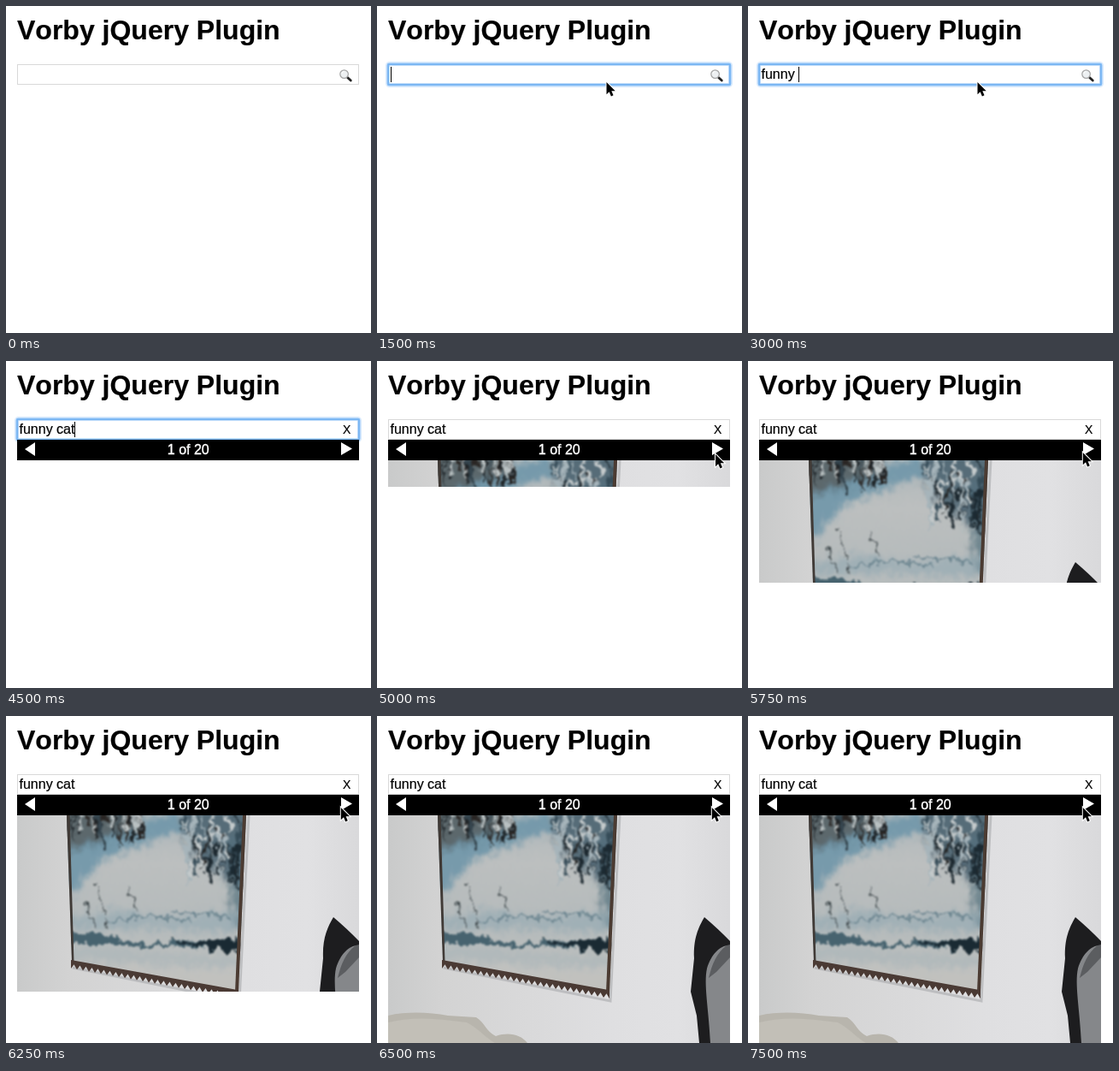
An HTML page that plays this animation: 427x382 px, repeating every 8 s.

```html
<!DOCTYPE html>
<html lang="en">
<head>
<meta charset="utf-8">
<title>Image search plugin</title>
<style>
html, body { margin: 0; width: 100%; height: 100%; overflow: hidden; background: #fff; }
svg { display: block; width: 427px; height: 382px; }
text { font: 16px "Liberation Sans", Arial, sans-serif; font-kerning: none; white-space: pre; stroke: #000; stroke-width: .2px; }
.title { font-size: 32px; font-weight: bold; }
.clear { font-size: 14px; }
.count { fill: #fff; stroke: #fff; stroke-width: .4px; }
</style>
</head>
<body>
<svg viewBox="0 0 427 382" xmlns="http://www.w3.org/2000/svg">
  <defs>
    <linearGradient id="wall">
      <stop offset="0" stop-color="#c9caca"/>
      <stop offset=".16" stop-color="#d3d3d3"/>
      <stop offset=".66" stop-color="#dfdfe1"/>
      <stop offset=".85" stop-color="#e1e1e3"/>
      <stop offset="1" stop-color="#d9d9db"/>
    </linearGradient>
    <linearGradient id="snow" x2="0" y2="1">
      <stop offset="0" stop-color="#a9b4b8"/>
      <stop offset=".3" stop-color="#bcbfbf"/>
      <stop offset=".6" stop-color="#b4babb"/>
      <stop offset=".8" stop-color="#c0c1bf"/>
      <stop offset="1" stop-color="#c4c1bb"/>
    </linearGradient>
    <clipPath id="loaded"><rect id="reveal" x="13" y="116" width="400" height="0"/></clipPath>
    <clipPath id="cloth"><path d="M71 116H281L272 322 77 288Z"/></clipPath>
    <filter id="soft" x="-20%" y="-20%" width="140%" height="140%"><feGaussianBlur stdDeviation="4"/></filter>
    <filter id="fine" x="-10%" y="-10%" width="120%" height="120%"><feGaussianBlur stdDeviation=".7"/></filter>
    <filter id="paint" color-interpolation-filters="sRGB" x="0" y="0" width="100%" height="100%">
      <feTurbulence type="fractalNoise" baseFrequency=".11 .08" numOctaves="3" seed="4" result="noise"/>
      <feDisplacementMap in="SourceGraphic" in2="noise" scale="17" xChannelSelector="R" yChannelSelector="G"/>
      <feGaussianBlur stdDeviation=".9"/>
    </filter>
  </defs>

  <text class="title" x="13" y="39">Vorby jQuery Plugin</text>

  <rect id="border" x="13.5" y="68.5" width="399" height="23" fill="#fff" stroke="#d9d9d9"/>
  <g id="ring" fill="none" stroke="#6fb1f5">
    <rect x="12.5" y="67.5" width="401" height="25" rx="2" stroke-width="5" opacity=".28"/>
    <rect x="13" y="68" width="400" height="24" rx="1" stroke-width="2.6" opacity=".85"/>
  </g>
  <text id="query" x="15.5" y="85"></text>
  <rect id="caret" x="16" y="71" width="1" height="18"/>

  <g id="lens">
    <path d="M399.5 83.5L403.3 87" stroke="#222" stroke-width="2.8" stroke-linecap="round"/>
    <circle cx="395.6" cy="79.6" r="4.8" fill="#edf0f2" stroke="#a3a3a3" stroke-width="1.2"/>
    <path d="M392.8 79a3 3 0 0 1 3-2.6" fill="none" stroke="#fff"/>
  </g>

  <g id="results">
    <text class="clear" x="394" y="85">X</text>
    <rect x="13" y="92" width="400" height="24"/>
    <path d="M22 103L34 95V111ZM405 102.5L392 95V110Z" fill="#fff"/>
    <text class="count" x="213.3" y="109" text-anchor="middle">1 of 20</text>
    <g clip-path="url(#loaded)">
      <rect x="13" y="116" width="400" height="266" fill="url(#wall)"/>
      <path d="M78 294L273 333 284 116" fill="none" stroke="#a9aaad" stroke-width="3" opacity=".6" filter="url(#fine)"/>
      <g clip-path="url(#cloth)">
        <g filter="url(#paint)">
          <rect x="50" y="96" width="252" height="250" fill="url(#snow)"/>
          <g filter="url(#soft)">
            <path d="M60 100H168L150 134 120 148 60 160Z" fill="#5c676c"/>
            <path d="M66 160L104 146 150 130 176 116 200 114 212 134 192 138 160 150 120 164 96 186 82 206 66 210Z" fill="#6b94a8" opacity=".85"/>
            <path d="M206 100H300V205L264 196 242 176 222 168 208 142Z" fill="#566c78"/>
            <path d="M256 140H300V256L268 250 262 214Z" fill="#536f7d" opacity=".7"/>
            <path d="M66 236L130 226 190 236 290 226V252L165 248 66 250Z" fill="#8ca6b1" opacity=".5"/>
            <path d="M66 266L140 272 190 278 290 280V296L66 284Z" fill="#a8b5b9" opacity=".6"/>
          </g>
          <g id="forest" fill="none"></g>
          <path d="M66 256L104 254 138 263 165 267 200 262 225 263 250 260 290 264V276L246 273 222 272 196 268 160 271 120 266 66 264Z" fill="#47636f"/>
          <path d="M190 262L222 265 248 260 290 264V276L250 274 222 270Z" fill="#1a2a33"/>
          <path d="M92 215Q98 232 104 247M108 196Q110 224 120 250M141 196Q150 216 152 230" fill="none" stroke="#3f484b" stroke-width="1.6"/>
          <path d="M120 240L170 233 215 240M195 228L262 236" fill="none" stroke="#6c8590" stroke-width="2"/>
        </g>
        <g filter="url(#fine)">
          <path d="M72 116L77 288" stroke="#403a36" stroke-width="5"/>
          <path d="M280 116L271 323" stroke="#4b3b32" stroke-width="6"/>
        </g>
      </g>
      <path id="fringe" fill="#4a3a34" filter="url(#fine)"/>
      <g filter="url(#fine)">
        <path d="M383 235C376 247 370 260 371 283L367 322 374 350 377 382H413V263C404 254 394 244 383 235Z" fill="#1d1d1f"/>
        <path d="M413 268C402 267 391 278 386 295 382 313 388 342 390 382H413Z" fill="#85878a"/>
        <path d="M409 268C397 277 392 290 388 306L397 299 413 282V267Z" fill="#5b5d60"/>
        <path d="M13 350C35 345 61 346 83 350L116 352C126 358 128 369 139 374 154 369 168 372 176 382H13Z" fill="#b8b5ad"/>
        <path d="M13 358C45 350 75 354 105 358 120 366 127 376 138 382H13Z" fill="#c2bfb7"/>
      </g>
    </g>
  </g>

  <path id="pointer" d="M0 0V14.2L3.2 11.2 5.4 16.4 8 15.3 5.8 10.2H10.2Z" fill="#000" stroke="#fff" stroke-width="2" paint-order="stroke"/>
</svg>
<script>
const LOOP = 8000;
const $ = id => document.getElementById(id);

// Each track is a list of [start ms, value], held until the next step.
const pointerAt = [[0, null], [250, [351.6, 112]], [500, [272.6, 113]], [750, [268.5, 89]],
  [4250, [385, 73]], [4500, null], [5000, [396, 109]], [5500, [394.5, 108]], [5750, [391.8, 107]]];
const typed = [[0, 0], [2250, 2], [2500, 3], [2750, 4], [3000, 6], [3250, 8], [3500, 9]];
const caretOn = [[0, false], [1500, true], [2000, false], [2250, true], [4000, false],
  [4250, true], [5000, false]];
const bottom = [[0, 116], [5000, 147], [5250, 195], [5500, 210], [5750, 259],
  [6000, 275], [6250, 322], [6500, 382]];

const at = (track, t) => track.reduce((value, [start, next]) => t >= start ? next : value, null);
const show = (id, on) => $(id).setAttribute("visibility", on ? "visible" : "hidden");

let seed = 11;
const random = () => (seed = seed * 16807 % 2147483647) / 2147483647;
const between = (a, b) => a + (b - a) * random();

function streaks(count, x0, x1, y0, y1, length, colors) {
  let out = "";
  for (let i = 0; i < count; i++) {
    const x = between(x0, x1), y = between(y0, y1), h = between(length * .4, length);
    const bend = between(-8, 8);
    out += `<path d="M${x} ${y}q${bend} ${h / 2} ${bend / 2} ${h}" stroke="${colors[i % colors.length]}" stroke-width="${between(1.5, 4.5)}"/>`;
  }
  return out;
}

function buildPicture() {
  $("forest").innerHTML =
    streaks(24, 78, 160, 104, 116, 40, ["#1f2529", "#35454e", "#2a2624"]) +
    streaks(10, 82, 160, 106, 122, 28, ["#bcc3c4"]) +
    streaks(24, 212, 282, 106, 165, 36, ["#1d2930", "#364c58", "#242424"]) +
    streaks(20, 206, 266, 110, 175, 34, ["#c4cacb", "#a6b4ba"]) +
    streaks(8, 258, 278, 145, 180, 35, ["#1c2a32"]);
  const teeth = 28, x0 = 76, x1 = 272, step = (x1 - x0) / teeth;
  const edge = x => 285 + (x - x0) * .18;
  let d = `M${x0} ${edge(x0)}L${x1} ${edge(x1)}V${edge(x1) + 10}`;
  for (let i = teeth; i > 0; i--) {
    const x = x0 + i * step;
    d += `L${x - step / 2} ${edge(x) + 4}L${x - step} ${edge(x - step) + 10}`;
  }
  $("fringe").setAttribute("d", d + "Z");
}

function draw(t) {
  const found = t >= 4250, focused = t >= 1500 && t < 5000;
  const count = at(typed, t), spot = at(pointerAt, t);
  const text = "funny cat".slice(0, count);
  if ($("query").textContent !== text) $("query").textContent = text;
  const width = count ? $("query").getComputedTextLength() : 0;
  $("caret").setAttribute("x", 16 + Math.floor(width));
  show("caret", at(caretOn, t));
  show("ring", focused);
  show("lens", !found);
  show("results", found);
  $("reveal").setAttribute("height", at(bottom, t) - 116);
  show("pointer", spot);
  if (spot) $("pointer").setAttribute("transform", `translate(${spot})`);
}

buildPicture();
draw(0);
const start = performance.now();
function tick() {
  draw((performance.now() - start) % LOOP);
  requestAnimationFrame(tick);
}
requestAnimationFrame(tick);
</script>
</body>
</html>
```
